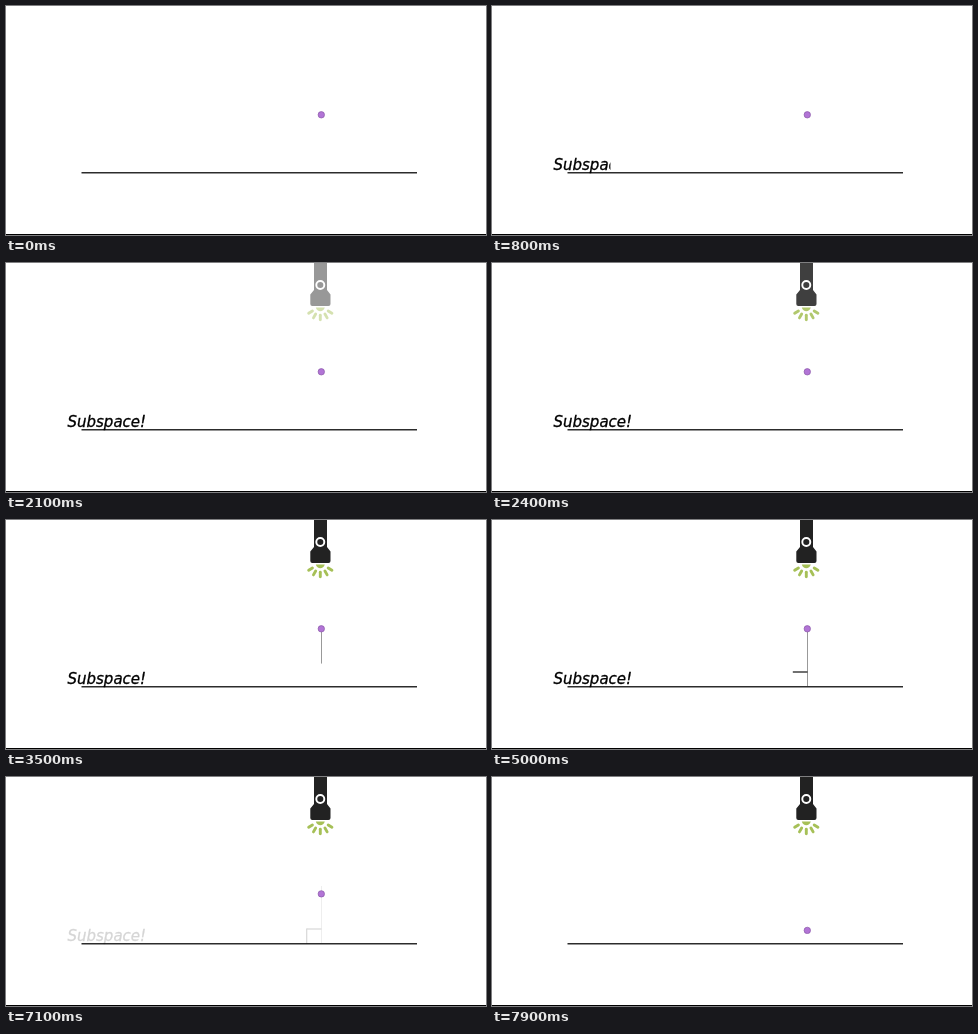
Animation of 480x229 px, one loop 8 s. Source, as an HTML page:

```html
<!DOCTYPE html>
<html lang="en">
<head>
<meta charset="utf-8">
<title>Projection onto a subspace</title>
<style>
  html, body { margin: 0; width: 100%; height: 100%; overflow: hidden; background: #fff; }
  svg { display: block; width: 100%; height: 100%; }
  text { font: oblique 15px "DejaVu Sans", sans-serif; stroke: #000; stroke-width: .3; }
</style>
</head>
<body>
<svg viewBox="0 0 480 229">
  <clipPath id="wipe"><rect id="wipeBox" x="61" y="145" width="0" height="30"/></clipPath>

  <path d="M0 228.5H480" stroke="#000"/>
  <path d="M75.5 166.7H411" stroke="#2c2c2c" stroke-width="1.4"/>

  <g id="torch" opacity="0">
    <path d="M308 0H321V27L324.5 31.5V41Q324.5 43 322.5 43H306.300Q304.300 43 304.300 41V31.500L308 27Z" fill="#222"/>
    <circle cx="314.300" cy="22" r="4" fill="none" stroke="#fff" stroke-width="1.900"/>
    <path d="M309.800 44.500H318.800Q317.500 48.300 314.300 48.300T309.800 44.500Z" fill="#a6c057"/>
    <g id="rays" stroke="#a6c057" stroke-width="2.900" stroke-linecap="round"></g>
  </g>

  <g id="notes">
    <text x="61.500" y="164" clip-path="url(#wipe)">Subspace!</text>
    <path id="drop" stroke="#999"/>
    <path id="cornerTop" stroke="#111" stroke-width="1.200"/>
    <path id="cornerSide" stroke="#111" stroke-width="1.200"/>
  </g>
  <circle id="dot" cx="315.300" cy="108.800" r="3.200" fill="#b274d6" stroke="#8a5aa8" stroke-width=".7"/>
</svg>
<script>
  const LOOP = 8000, STEP = 100;
  const el = id => document.getElementById(id);
  const set = (id, name, value) => el(id).setAttribute(name, value);
  const ramp = (t, from, to) => Math.min(1, Math.max(0, (t - from) / (to - from)));
  const easeInOut = p => p < .5 ? 2 * p * p : 1 - 2 * (1 - p) ** 2;

  // Light rays fan out below the lens
  el('rays').innerHTML = [-58, -30, 0, 30, 58].map(angle =>
    `<path d="M314.3 52.3V56.7" transform="rotate(${angle} 314.3 43)"/>`).join('');

  function draw(t) {
    set('wipeBox', 'width', 41 * ramp(t, 0, 500) + 41 * ramp(t, 600, 1100));
    set('torch', 'opacity', ramp(t, 1755, 2500));

    const drop = ramp(t, 2760, 3980), top = ramp(t, 4500, 5000), side = ramp(t, 5450, 6000);
    set('drop', 'd', drop ? `M315.5 109V${109 + 57 * drop}` : '');
    set('cornerTop', 'd', top ? `M315.5 152H${315.5 - 14.7 * top}` : '');
    set('cornerSide', 'd', side ? `M300.7 151.5V${151.5 + 15 * side}` : '');

    set('notes', 'opacity', 1 - ramp(t, 6600, 7200));
    set('dot', 'cy', 108.8 + 57.5 * easeInOut(ramp(t, 6570, 8570)));
  }

  function tick() {
    draw(Math.floor(performance.now() % LOOP / STEP) * STEP);
    requestAnimationFrame(tick);
  }
  tick();
</script>
</body>
</html>
```
